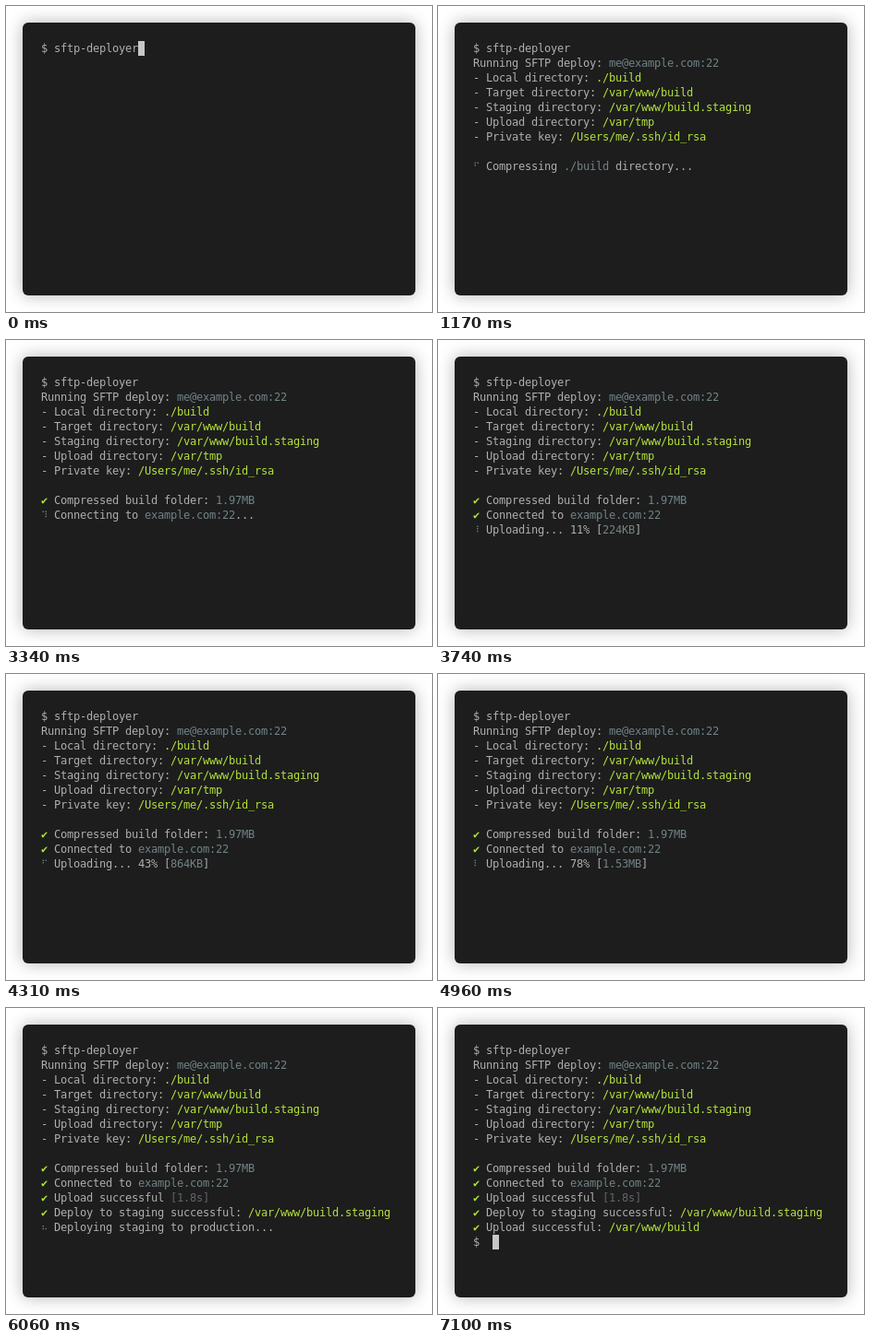
An HTML page for the animation above (7500 ms loop, 461 px wide and 332 px high).

```html
<!DOCTYPE html>
<html lang="en">
<head>
<meta charset="utf-8">
<title>Terminal deploy</title>
<style>
  html, body { margin: 0; width: 100%; height: 100%; overflow: hidden; background: #fff; }
  .window {
    position: absolute; left: 18px; top: 18px; width: 425px; height: 296px;
    border-radius: 6px; background: #1d1d1d;
    box-shadow: 0 0 18px rgba(0, 0, 0, .3);
  }
  pre {
    position: absolute; left: 20px; top: 20px; margin: 0;
    font: 12px/16px "DejaVu Sans Mono", monospace;
    letter-spacing: -.2246px; color: #afafaf;
  }
  .row { height: 16px; }
  .green { color: #b3e33b; }
  .cyan { color: #708387; }
  .dim { color: #626566; }
  .spin, .tick, .cursor {
    display: inline-block; width: 7px; height: 16px;
    vertical-align: top; letter-spacing: 0;
  }
  .spin { font: 9.5px/16px "DejaVu Sans", sans-serif; color: #708387; }
  .tick { color: #b3e33b; }
  .cursor { background: #c7c7c7; }
</style>
</head>
<body>
<div class="window"><pre id="screen"></pre></div>
<script>
const LOOP = 7500, TICK = 80, TOTAL_KB = 1.97 * 1024, CHUNK_KB = 32;
const SPINNER = '⠋⠙⠹⠸⠼⠴⠦⠧⠇⠏';
const screen = document.getElementById('screen');

const span = (name, text = '') => `<span class="${name}">${text}</span>`;
const green = text => span('green', text);
const cyan = text => span('cyan', text);
const done = text => `${span('tick', '✔')} ${text}`;
const cursor = span('cursor');

const header = [
  'Running SFTP deploy: ' + cyan('me@example.com:22'),
  '- Local directory: ' + green('./build'),
  '- Target directory: ' + green('/var/www/build'),
  '- Staging directory: ' + green('/var/www/build.staging'),
  '- Upload directory: ' + green('/var/tmp'),
  '- Private key: ' + green('/Users/me/.ssh/id_rsa'),
  ''
];

function uploading(step) {
  const kb = CHUNK_KB * Math.max(0, Math.round(7 + 2.8 * (step - 3)));
  if (!kb) return 'Uploading...';
  const size = kb < 1024 ? kb + 'KB' : (kb / 1024).toFixed(2) + 'MB';
  return `Uploading... ${Math.round(kb / TOTAL_KB * 100)}% [${cyan(size)}]`;
}

// marks: [time, spinner step]; the last mark ends the task
const tasks = [
  { marks: [[1170, 0], [1750, 7]],
    busy: () => `Compressing ${cyan('./build')} directory...`,
    result: 'Compressed build folder: ' + cyan('1.97MB') },
  { marks: [[1750, 0], [3340, 2], [3500, 4]],
    busy: () => `Connecting to ${cyan('example.com:22')}...`,
    result: 'Connected to ' + cyan('example.com:22') },
  { marks: [[3500, 0], [4880, 17], [5300, 23]],
    busy: uploading,
    result: 'Upload successful ' + span('dim', '[1.8s]') },
  { marks: [[5300, 0], [5570, 4]],
    busy: () => 'Deploying to staging...',
    result: 'Deploy to staging successful: ' + green('/var/www/build.staging') },
  { marks: [[5570, 0], [6100, 7]],
    busy: () => 'Deploying staging to production...',
    result: 'Upload successful: ' + green('/var/www/build') }
];

function stepAt(marks, t) {
  const next = marks.findIndex(([time]) => time > t);
  const [time, step] = marks[next - 1];
  return Math.min(step + Math.floor((t - time) / TICK), marks[next][1] - 1);
}

function taskRow({ marks, busy, result }, t) {
  if (t >= marks[marks.length - 1][0]) return done(result);
  const step = stepAt(marks, t);
  return `${span('spin', SPINNER[step % SPINNER.length])} ${busy(step)}`;
}

function rowsAt(t) {
  const command = '$ sftp-deployer';
  if (t < 1000) return [command + cursor];
  if (t < 1170) return [command, cursor];
  const started = tasks.filter(task => t >= task.marks[0][0]);
  const rows = [command, ...header, ...started.map(task => taskRow(task, t))];
  if (t >= 6100) rows.push((t < 7100 ? '$ ' : '$  ') + cursor);
  return rows;
}

let shown = '';
function draw() {
  const html = rowsAt(performance.now() % LOOP)
    .map(row => `<div class="row">${row}</div>`).join('');
  if (html !== shown) screen.innerHTML = shown = html;
  requestAnimationFrame(draw);
}
draw();
</script>
</body>
</html>
```
